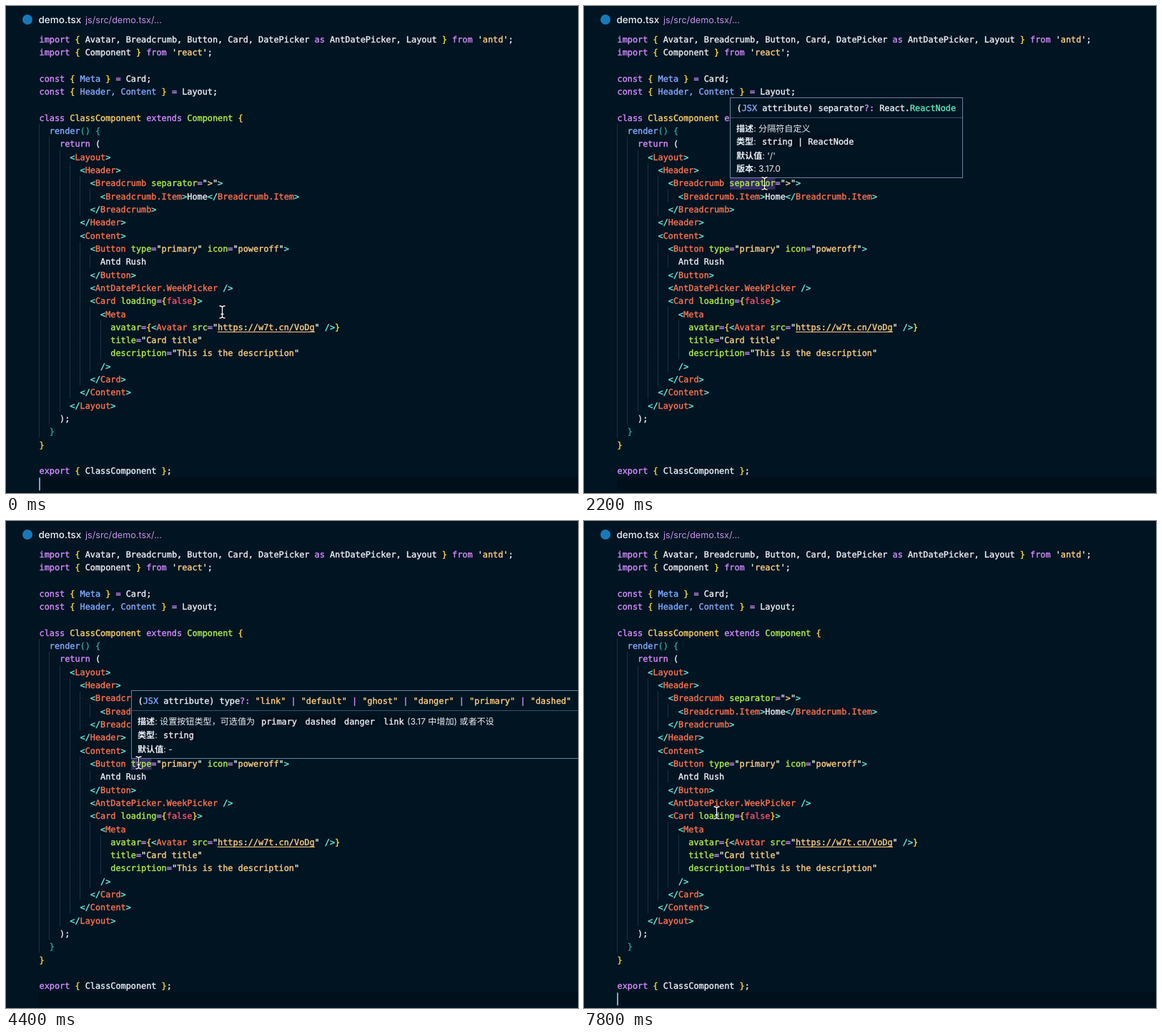
Animation, 800 px wide and 682 px high, one loop 8 s. Source, as an HTML page:

```html
<!DOCTYPE html>
<html lang="en">
<head>
<meta charset="utf-8">
<title>Editor hover hints</title>
<style>
  html, body { margin: 0; width: 100%; height: 100%; overflow: hidden; background: #011421; }
  svg { display: block; width: 100%; height: 100%; }
  text { white-space: pre; text-rendering: geometricPrecision; }
  .mono { font: 11.85px "DejaVu Sans Mono", monospace; stroke-width: .35px; }
  .prose { font: 12.1px Inter, "Noto Sans CJK SC", "Noto Sans CJK", sans-serif; fill: #eaeff7; }
  .prose .label { font-weight: 700; }
  .box { fill: #011421; stroke: #5f87a0; }
  .rule { stroke: #34536a; }
  .chip { fill: #01101b; }
  .mark { fill: #352a63; }
</style>
</head>
<body>
<svg id="stage" viewBox="0 0 800 682"></svg>
<script>
const LEFT = 46.5, CHAR = 7.13, ROW = 18.32, TOP = 46, LOOP = 8000, STEP = 200;

const colors = {
  k: '#d68cff', y: '#ffdc2e', w: '#edf0f8', b: '#82aaff', s: '#ffcf80', q: '#e2f7e4',
  c: '#ffd16b', g: '#aef04a', t: '#62f0dc', o: '#ff7350', r: '#ff4d6d', d: '#27a890', n: '#5fe6bc'
};

// Each "~x" switches to the colour with key x.
const code = [
  "~kimport ~y{ ~wAvatar, Breadcrumb, Button, Card, DatePicker ~kas ~wAntDatePicker, Layout ~y} ~kfrom ~q'~santd~q'~w;",
  "~kimport ~y{ ~wComponent ~y} ~kfrom ~q'~sreact~q'~w;",
  "",
  "~kconst ~y{ ~bMeta ~y} ~k= ~wCard;",
  "~kconst ~y{ ~bHeader, Content ~y} ~k= ~wLayout;",
  "",
  "~kclass ~cClassComponent ~kextends ~gComponent ~y{",
  "  ~brender~d() {",
  "    ~kreturn ~w(",
  "      ~t<~oLayout~t>",
  "        ~t<~oHeader~t>",
  "          ~t<~oBreadcrumb ~gseparator~k=~q\"~s>~q\"~t>",
  "            ~t<~oBreadcrumb.Item~t>~wHome~t</~oBreadcrumb.Item~t>",
  "          ~t</~oBreadcrumb~t>",
  "        ~t</~oHeader~t>",
  "        ~t<~oContent~t>",
  "          ~t<~oButton ~gtype~k=~q\"~sprimary~q\" ~gicon~k=~q\"~spoweroff~q\"~t>",
  "            ~wAntd Rush",
  "          ~t</~oButton~t>",
  "          ~t<~oAntDatePicker.WeekPicker ~t/>",
  "          ~t<~oCard ~gloading~k=~y{~rfalse~y}~t>",
  "            ~t<~oMeta",
  "              ~gavatar~k=~y{~t<~oAvatar ~gsrc~k=~q\"~shttps://w7t.cn/VoDg~q\" ~t/>~y}",
  "              ~gtitle~k=~q\"~sCard title~q\"",
  "              ~gdescription~k=~q\"~sThis is the description~q\"",
  "            ~t/>",
  "          ~t</~oCard~t>",
  "        ~t</~oContent~t>",
  "      ~t</~oLayout~t>",
  "    ~w);",
  "  ~d}",
  "~y}",
  "",
  "~kexport ~y{ ~wClassComponent ~y}~w;"
];

const escapeText = s => s.replace(/&/g, '&amp;').replace(/</g, '&lt;');
const rect = (cls, x, y, w, h) => `<rect class="${cls}" x="${x}" y="${y}" width="${w}" height="${h}"/>`;

function monoLine(source, x, middle) {
  const [indent, ...tokens] = source.split('~');
  let col = indent.length;
  const spans = tokens.map(token => {
    const text = token.slice(1), color = colors[token[0]];
    const span = `<tspan x="${x + col * CHAR}" fill="${color}" stroke="${color}">${escapeText(text)}</tspan>`;
    col += text.length;
    return span;
  });
  return `<text class="mono" y="${middle + 4.8}">${spans.join('')}</text>`;
}

function guides(source, row) {
  const indent = source.match(/^ */)[0].length;
  let out = '';
  for (let col = 0; col < indent; col += 2)
    out += `<rect x="${Math.floor(LEFT + col * CHAR)}" y="${TOP - 9.2 + row * ROW}" width="1" height="${ROW}" fill="#15334c"/>`;
  return out;
}

const prose = (x, middle, label, text = '') =>
  `<text class="prose" x="${x}" y="${middle + 4.8}"><tspan class="label">${label}</tspan>${text}</text>`;
const chip = (x, middle, text) =>
  rect('chip', x - 3, middle - 8, text.length * CHAR + 6, 16) + monoLine('~w' + text, x, middle);

const separatorTip =
  rect('box', 204.5, 128.5, 325, 112) + '<path class="rule" d="M205 156.5H529"/>' +
  monoLine('~w(~bJSX ~wattribute) separator~k?: ~wReact.~nReactNode', 213.5, 142) +
  prose(213, 171, '描述', ': 分隔符自定义') +
  prose(213, 189.5, '类型', ':') + chip(249, 189.5, 'string | ReactNode') +
  prose(213, 209, '默认值', ": '/'") +
  prose(213, 227.5, '版本', ': 3.17.0');

const kinds = ['link', 'default', 'ghost', 'danger', 'primary', 'dashed'].map(s => `~s"${s}"`).join(' ~k| ');
const typeTip =
  rect('box', 175.5, 237.5, 640, 95) + '<path class="rule" d="M176 265.5H800"/>' +
  monoLine('~w(~bJSX ~wattribute) type~k?: ' + kinds, 184.5, 251) +
  prose(184, 280.5, '描述', ': 设置按钮类型，可选值为') +
  chip(357, 280.5, 'primary') + chip(418.5, 280.5, 'dashed') +
  chip(473, 280.5, 'danger') + chip(528, 280.5, 'link') +
  prose(561, 280.5, '', '(3.17 中增加) 或者不设') +
  prose(184, 299.5, '类型', ':') + chip(220, 299.5, 'string') +
  prose(184, 319, '默认值', ': -');

const beam = 'M-4 -8.5Q0 -8.5 0 -6Q0 -8.5 4 -8.5M0 -6V6M-4 8.5Q0 8.5 0 6Q0 8.5 4 8.5M-2 3H2';

document.getElementById('stage').innerHTML = `
  <rect width="800" height="682" fill="#011421"/>
  <rect x="46" y="660" width="754" height="19" fill="#010f1a"/>
  <circle cx="30" cy="19" r="7" fill="#1879b9"/>
  <text x="45.5" y="23.8" fill="#eef1f8" font-family="Inter, sans-serif" font-size="13.5" font-weight="500">demo.tsx</text>
  <text x="111" y="23.8" fill="#c792ea" font-family="Inter, sans-serif" font-size="12.6">js/src/demo.tsx/...</text>
  ${code.map(guides).join('')}
  <g id="separatorMark">${rect('mark', 204, 239, 63.5, 18)}</g>
  <g id="typeMark">${rect('mark', 175, 330.5, 28.5, 18)}</g>
  ${code.map((line, row) => monoLine(line, LEFT, TOP + row * ROW)).join('')}
  <rect x="296" y="456" width="136" height="1" fill="${colors.s}"/>
  <g id="separatorTip">${separatorTip}</g>
  <g id="typeTip">${typeTip}</g>
  <rect id="caret" x="46" y="660.5" width="2" height="18" fill="#80a4c2"/>
  <g id="pointer" fill="none">
    <path d="${beam}" stroke="#05090d" stroke-width="3.2"/>
    <path d="${beam}" stroke="#fff" stroke-width="1.3"/>
  </g>`;

const el = id => document.getElementById(id);
const show = (id, on) => el(id).setAttribute('visibility', on ? 'visible' : 'hidden');

// Pointer moves: start, end, destination.
const start = [302.5, 428.5];
const moves = [
  [200, 1000, [252.5, 248.5]],
  [3600, 4000, [185.5, 338.5]],
  [7400, 7800, [185.5, 408.5]]
];

function pointerAt(t) {
  let [x, y] = start;
  for (const [from, to, [endX, endY]] of moves) {
    const p = Math.min(1, Math.max(0, (t - from) / (to - from)));
    const eased = p * p * (3 - 2 * p);
    x += (endX - x) * eased;
    y += (endY - y) * eased;
  }
  return `${x} ${y}`;
}

function draw(now) {
  const t = Math.floor((now % LOOP) / STEP) * STEP;
  const onSeparator = t >= 1200 && t < 3800;
  const onType = t >= 4200 && t < 7600;
  show('separatorMark', onSeparator);
  show('separatorTip', onSeparator);
  show('typeMark', onType);
  show('typeTip', onType);
  show('caret', (t + 350) % 1000 < 500);
  el('pointer').setAttribute('transform', `translate(${pointerAt(t)})`);
}

const begin = performance.now();
function tick() {
  draw(performance.now() - begin);
  requestAnimationFrame(tick);
}
tick();
</script>
</body>
</html>
```
